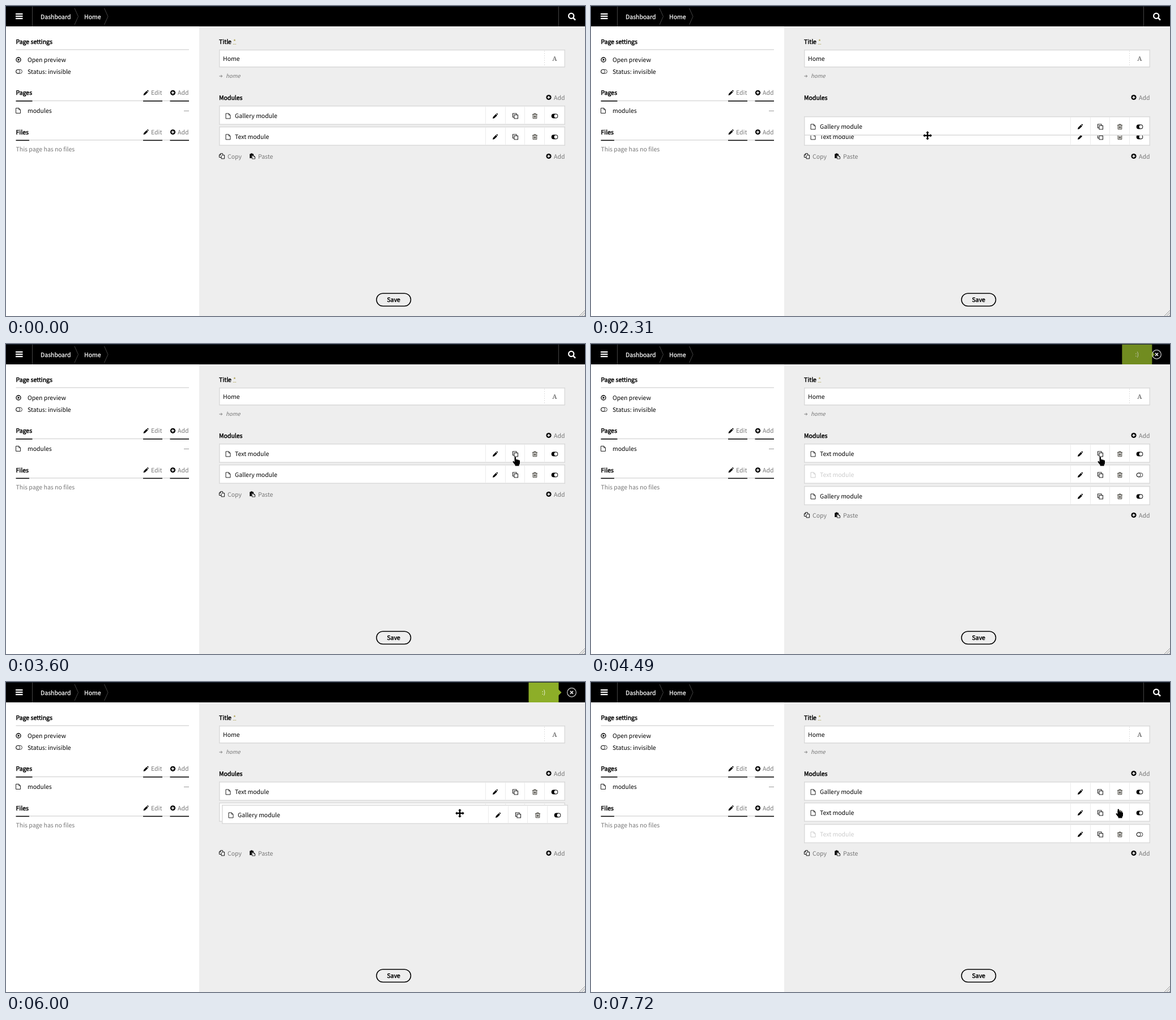
These frames come from a looping animation (1022 px wide and 548 px high, 8 s). An HTML page:

```html
<!DOCTYPE html>
<html lang="en">
<head>
<meta charset="utf-8">
<title>Page editor</title>
<style>
html, body { margin: 0; width: 100%; height: 100%; overflow: hidden; background: #fff; }
svg { display: block; width: 100vw; height: 100vh; text-rendering: geometricPrecision;
  font: 10.5px "Noto Sans CJK JP", "Noto Sans CJK SC", "Noto Sans CJK", sans-serif; }
</style>
</head>
<body>
<svg id="stage" viewBox="0 0 1022 548">
  <defs>
    <path id="pencil" d="M-4.5 4.5L-3.7 1.5L1.2 -3.4L3.5 -1.1L-1.4 3.8ZM1.9 -4.1L2.7 -4.8Q3.2 -5.1 3.7 -4.6L4.5 -3.8Q5 -3.3 4.5 -2.7L4.1 -1.9Z"/>
    <g id="plus"><circle r="4.6"/><path d="M-2.6 0H2.6M0 -2.6V2.6" stroke="#fff" stroke-width="1.5"/></g>
    <path id="page" d="M-4 -4.5H1.2L4 -1.7V4.5H-4ZM1.2 -4.5V-1.7H4" fill="none" stroke-width="1"/>
    <path id="clone" d="M-2 -2H4.5V4.5H-2ZM-2 2H-4.5V-4.5H2V-2" fill="none" stroke="#222" stroke-width="1.1"/>
    <path id="trash" d="M-4.5 -2.8H4.5M-1.6 -2.8V-4.4H1.6V-2.8M-3.3 -2.8V4.3H3.3V-2.8M-1.4 -1V2.8M0 -1V2.8M1.4 -1V2.8" fill="none" stroke="#2b2920" stroke-width=".9"/>
    <g id="on"><rect x="-5.8" y="-3.9" width="11.6" height="7.8" rx="3.9"/><circle cx="2" r="2.9" fill="#fff"/></g>
    <g id="off" fill="none" stroke="#222" stroke-width=".9"><rect x="-5.4" y="-3.5" width="10.8" height="7" rx="3.5"/><circle cx="-1.9" r="3.5"/></g>
    <g id="pages" fill="none" stroke="#111"><path d="M-1 -2.5L1 -4.5H4.6V1.8H-1Z" fill="#eee" transform="translate(0 2.6)"/><path d="M-1 2H-4.6V-2.4L-2.2 -4.7H1.6V-2.2M-2 -4.5V-2.2H-4.5"/></g>
    <g id="paste"><path d="M-4.8 -4H-3V-5H0V-4H2V-1.6H-1.4V3.6H-4.8Z"/><path d="M-.6 -1H2.3L4.6 1.2V4.6H-.6ZM2.3 -1V1.2H4.6" fill="#fff" stroke="#111" stroke-width=".9"/></g>
    <g fill="#fff" stroke="#222" stroke-width=".9" stroke-linejoin="round">
      <path id="arrow" d="M.5 .5V12.6L3.2 10L5.3 15L7.3 14.2L5.2 9.3H8.9Z"/>
      <path id="hand" d="M-1.4 10V1.6Q-1.4 .4 -.2 .4T1.1 1.6V5.8Q1.2 4.7 2.3 4.8T3.6 6.1Q3.8 5.2 4.9 5.4T6 6.7Q6.3 6 7.1 6.3T8 7.5V11.6Q8 13.4 6.6 14.6V16.5H-.3V14.8Q-2.6 12.3 -4.2 9.7Q-4.8 8.4 -3.7 8.1T-1.4 10ZM1.1 5.8V8.5M3.6 6.1V8.7M6 6.7V8.8"/>
      <path id="move" d="M0 -7.8L3 -4.8H1.2V-1.2H4.8V-3L7.8 0L4.8 3V1.2H1.2V4.8H3L0 7.8L-3 4.8H-1.2V1.2H-4.8V3L-7.8 0L-4.8 -3V-1.2H-1.2V-4.8H-3Z"/>
    </g>
  </defs>
</svg>
<script>
const stage = document.getElementById('stage');
const GREY = '#777', LINE = '#dadada', LOOP = 8000;

const text = (x, y, s, fill = '#000', more = '') => `<text x="${x}" y="${y}" fill="${fill}" ${more}>${s}</text>`;
const strong = (x, y, s, fill = '#000', w = .45, more = '') =>
  text(x, y, s, fill, `stroke="${fill}" stroke-width="${w}" ${more}`);
const icon = (id, x, y, more = '') => `<use href="#${id}" x="${x}" y="${y}" ${more}/>`;
const path = (d, stroke, w = 1, more = '') => `<path d="${d}" fill="none" stroke="${stroke}" stroke-width="${w}" ${more}/>`;
const box = (x, y, w, h, fill, more = '') => `<rect x="${x}" y="${y}" width="${w}" height="${h}" fill="${fill}" ${more}/>`;
const border = `stroke="${LINE}" stroke-width="1.5"`;
const add = y => icon('plus', 958, y - 4.2) + text(967, y, 'Add', GREY);

function sideHead(y, label, w) {
  return strong(17.5, y, label) + icon('pencil', 247, y - 3.5) + text(256, y, 'Edit', GREY) +
    icon('plus', 294.5, y - 3.7) + text(303, y, 'Add', GREY) +
    path(`M17.5 ${y + 10.5}H323`, LINE, 1.4) +
    path(`M17.5 ${y + 10.9}h${w}M242 ${y + 10.9}h34M289.5 ${y + 10.9}h33.5`, '#000', 1.5);
}

function row(id, label, shown) {
  const ink = shown ? '#000' : '#ccc';
  return `<g id="${id}">` + box(376.75, .75, 609.5, 32.5, '#fff', border) +
    path('M846.5 2V32M881.5 2V32M915.5 2V32M950.5 2V32', '#ebebeb') +
    icon('page', 392, 18.5, `stroke="${shown ? '#222' : '#ccc'}"`) + text(404, 22, label, ink) +
    icon('pencil', 863.5, 18.5) + icon('clone', 899, 18.5) + icon('trash', 933.5, 18.5) +
    icon(shown ? 'on' : 'off', 968.5, 18.5) + '</g>';
}

const header = box(0, 0, 1022, 36, '#000') + box(0, 0, 1022, 1, '#1c2736') +
  path('M17 14.2H29.5M17 18.2H29.5M17 22.2H29.5', '#fff', 2.2) +
  path('M46.5 1V36', '#444') +
  path('M121 4L127.5 18.5L121 33M173.5 4L180 18.5L173.5 33', '#444') +
  strong(61, 22.5, 'Dashboard', '#fff', .25) + strong(138, 22.5, 'Home', '#fff', .25) +
  '<g id="search">' + path('M975.5 1V36', '#444') +
  '<circle cx="997.7" cy="17.5" r="4.6" fill="none" stroke="#fff" stroke-width="2.2"/>' +
  path('M1001 20.8L1005 24.8', '#fff', 2.6) + '</g>' +
  '<g id="notice"><g id="slide">' + box(922.5, 1, 53, 35, '#8dae28') +
  '<path d="M975 13L980.5 18.5L975 24Z" fill="#8dae28"/>' +
  text(949, 22.3, ':)', '#fff', 'text-anchor="middle"') + '</g>' +
  '<circle cx="998.5" cy="18.5" r="7.8" fill="none" stroke="#ccc" stroke-width="1.2"/>' +
  path('M996 16L1001 21M1001 16L996 21', '#fff', 1.7) + '</g>';

const side = strong(17.5, 66.5, 'Page settings') + path('M17.5 77.3H323', LINE, 1.4) +
  '<circle cx="22" cy="95" r="4" fill="none" stroke="#000" stroke-width="1.3"/><path d="M20.7 92.8L24.4 95L20.7 97.2Z"/>' +
  text(38, 98.7, 'Open preview') + icon('off', 23, 115.8) + text(38, 119.8, 'Status: invisible') +
  sideHead(157, 'Pages', 29) + icon('page', 21.5, 185, 'stroke="#222"') + text(38, 189, 'modules') +
  path('M314 185.5H323', '#999') +
  sideHead(226.5, 'Files', 23.5) + text(17.5, 257, 'This page has no files', GREY);

const main = box(341, 36, 681, 512, '#eee') +
  strong(376, 66.5, 'Title') + text(401, 67, '*', '#a5963c') + path('M401 67.5H406', '#a5963c', 1, 'stroke-dasharray="1 1"') +
  box(376.75, 77.75, 609.5, 30, '#fff', border) + text(383, 97.3, 'Home') +
  path('M950.5 79V107', '#ddd', 1, 'stroke-dasharray="2 2"') +
  text(968.3, 97, 'A', GREY, 'text-anchor="middle" font-family="Noto Serif, serif" font-weight="700" font-size="11"') +
  path('M376.5 124H381.5M379.5 122L381.7 124L379.5 126', GREY) +
  text(388, 126.8, 'home', GREY, 'font-style="italic" font-size="9.5"') +
  strong(376, 165.7, 'Modules') + add(165.7) +
  row('text', 'Text module', true) + row('copy', 'Text module', false) +
  '<g id="foot">' + icon('pages', 381, 265.5) + text(391, 269.7, 'Copy', GREY) +
  icon('paste', 435, 265.5) + text(445, 269.7, 'Paste', GREY) + add(269.7) + '</g>' +
  row('gallery', 'Gallery module', true) +
  box(654, 508, 60.5, 22.5, 'none', 'rx="11.25" stroke="#000" stroke-width="1.5"') +
  strong(684.2, 523.2, 'Save', '#000', .45, 'text-anchor="middle"') +
  path('M1012 548L1022 538M1016 548L1022 542M1020 548L1022 546', '#999');

stage.insertAdjacentHTML('beforeend', main + side + header + '<use id="cursor"/>');
const el = id => document.getElementById(id);
const parts = {};
for (const id of ['text', 'copy', 'gallery', 'foot', 'search', 'notice', 'slide', 'cursor']) parts[id] = el(id);

// pointer moves: start ms, end ms, target x, target y
const START = [11, 256];
const MOVES = [
  [660, 1450, 590, 211], [1470, 1490, 593, 210], [1800, 1820, 593.5, 207],
  [2070, 2550, 594, 244], [2980, 3600, 898.5, 199], [4860, 5440, 795, 272.5],
  [5740, 6340, 807.5, 187], [7130, 7720, 930.5, 224]
];
// drags: press ms, release ms, slot where the row was
const DRAGS = [[2070, 2670, 0], [5740, 6680, 2]];
const LAG = 30;

const clamp = v => Math.min(1, Math.max(0, v));
const slot = i => 176 + Math.round(37.4 * i);
const at = (node, x, y) => node.setAttribute('transform', `translate(${x} ${y})`);
const show = (node, on) => node.setAttribute('visibility', on ? 'visible' : 'hidden');

function pointer(t) {
  let [x, y] = START;
  for (const [a, b, tx, ty] of MOVES) {
    if (t < a) break;
    const u = clamp((t - a + 20) / Math.max(40, b - a - 20));
    const k = (1 - Math.cos(Math.PI * u)) / 2;
    x += (tx - x) * k;
    y += (ty - y) * k;
  }
  return { x, y };
}

function cursorKind(p, count, dragging) {
  if (dragging) return 'move';
  for (let i = 0; i < count; i++) {
    const inside = p.y >= slot(i) && p.y < slot(i) + 33.5 && p.x > 376 && p.x < 987;
    if (inside) return p.x > 846 ? 'hand' : 'move';
  }
  return 'arrow';
}

function galleryPlace(t, y) {
  if (t < 2070) return 0;
  if (t < 2670) return y > 230.5 ? 1 : 0;
  if (t < 4340) return 1;
  if (t < 5740) return 2;
  return y < 193 ? 0 : y < 230.5 ? 1 : 2;
}

function render(t) {
  const p = pointer(t), late = pointer(t - LAG);
  const three = t >= 4340;
  const drag = DRAGS.find(d => t >= d[0] && t < d[1]);
  const g = t >= 6680 ? 0 : galleryPlace(t, late.y);

  at(parts.text, 0, slot(g <= 0 ? 1 : 0));
  at(parts.copy, 0, slot(g <= 1 ? 2 : 1));
  show(parts.copy, three);
  at(parts.foot, 0, three ? 37 : 0);
  if (drag) {
    const from = pointer(drag[0] - LAG);
    at(parts.gallery, Math.round(late.x - from.x), slot(drag[2]) + Math.round(late.y - from.y));
  } else at(parts.gallery, 0, slot(g));

  const note = three && t < 6950;
  show(parts.search, !note);
  show(parts.notice, note);
  const e = 1 - (1 - clamp((t - 4380) / 200)) ** 2;
  at(parts.slide, 75 * (1 - e), 0);
  parts.slide.setAttribute('opacity', e);

  show(parts.cursor, t >= 660);
  parts.cursor.setAttribute('href', '#' + cursorKind(p, three ? 3 : 2, drag));
  at(parts.cursor, Math.round(p.x), Math.round(p.y));
}

const begin = performance.now();
function tick() {
  render((performance.now() - begin) % LOOP);
  requestAnimationFrame(tick);
}
render(0);
tick();
</script>
</body>
</html>
```
